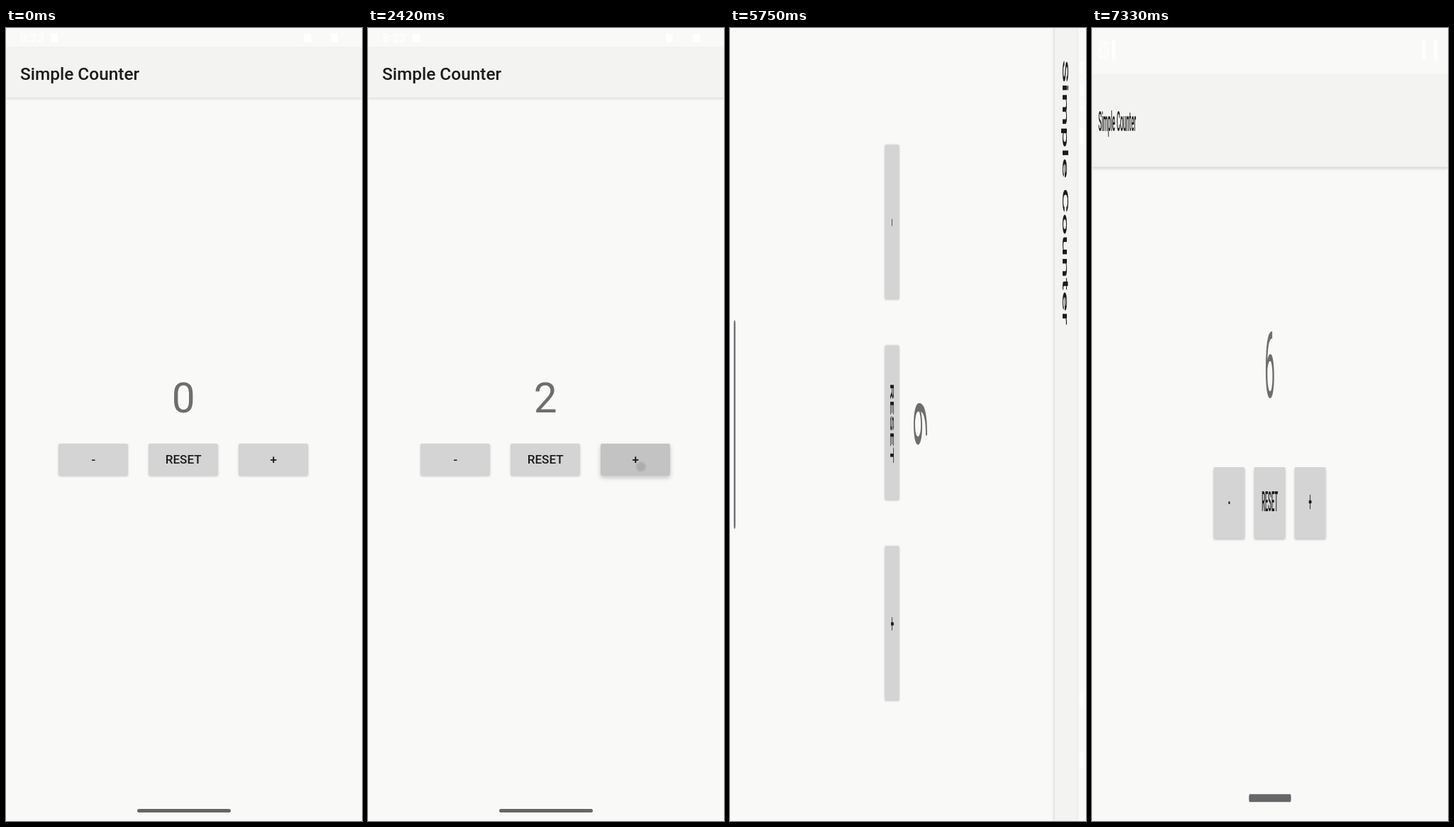
These frames come from a looping animation (502 by 1116 pixels, 8 s). An HTML page:

```html
<!DOCTYPE html>
<html lang="en">
<head>
<meta charset="utf-8">
<title>Counter</title>
<style>
  html, body { margin: 0; width: 100%; height: 100%; overflow: hidden; background: #f9f9f8; }
  #display { position: absolute; overflow: hidden; transform-origin: 0 0; background: #f9f9f8; }
  .screen {
    position: absolute; left: 50%; top: 50%; overflow: hidden;
    background: #f9f9f8; color: #1b1b1b; font-family: Roboto, sans-serif;
  }
  .portrait { width: 502px; height: 1116px; --bar: 70px; --top: 28px; --title: 65px; --title-size: 24.4px; }
  .landscape { width: 1116px; height: 502px; --bar: 59px; --top: 29px; --title: 59.4px; --title-size: 17.1px; }
  .screen * { position: absolute; box-sizing: border-box; white-space: nowrap; }
  .status { inset: 0 0 auto; height: 28px; color: #fff; font: 500 17px/28px Roboto, sans-serif; }
  .status span { left: 20px; }
  .status i { top: 8px; width: 10px; height: 12px; background: #fff; }
  .bar {
    left: 0; right: 0; top: var(--top); height: var(--bar);
    background: #f3f3f1; box-shadow: 0 1px 4px rgba(0, 0, 0, .16);
  }
  .title {
    left: 20px; top: calc(var(--title) - 20px);
    font-weight: 500; font-size: var(--title-size); line-height: 40px;
  }
  .count {
    left: -.8px; width: 100%; top: calc(50% - 77px); text-align: center;
    font-size: 58.6px; line-height: 80px; color: #6e6e6e;
  }
  .button {
    top: calc(50% + 26.6px); width: 98px; height: 45px; border-radius: 2.4px;
    background: #d4d4d4; box-shadow: 0 1px 3px rgba(0, 0, 0, .2);
    text-align: center; font-weight: 500; font-size: 17.1px; line-height: 45px;
  }
  .ripple { inset: 0; border-radius: 2.4px; }
  .pill { left: calc(50% - 66px); bottom: 12px; width: 132px; height: 5px; border-radius: 3px; background: #66666a; }
</style>
</head>
<body>
<div id="display"></div>
<script>
const LOOP = 8000, TURN = 5750, SPIN = 6920, SPIN_TIME = 400, OLD_FADE = 130;
const FIRST_TAP = 1420, TAP_GAP = 485, TAPS = 6, RELEASE = 100;
const SHORT = 502, LONG = 1116;

const display = document.getElementById('display');
const clamp = x => Math.max(0, Math.min(1, x));
const button = (label, offset) =>
  `<div class="button" style="left:calc(50% + ${offset}px)"><div class="ripple"></div>${label}</div>`;

function addScreen(kind) {
  const el = document.createElement('div');
  el.className = `screen ${kind}`;
  el.innerHTML = `
    <div class="bar"></div>
    <div class="status"><span>8:23</span><i style="left:63px"></i><i style="right:72px"></i><i style="right:34px"></i></div>
    <div class="title">Simple Counter</div>
    <div class="count">6</div>
    ${button('-', -176.8)}${button('RESET', -49.8)}${button('+', 77.2)}
    <div class="pill"></div>`;
  display.append(el);
  return el;
}

const landscape = addScreen('landscape');
const portrait = addScreen('portrait');
const count = portrait.querySelector('.count');
const plus = portrait.querySelectorAll('.button')[2];
const ripple = plus.querySelector('.ripple');

// Each tap grows a spot from the finger, holds it, then fades it out.
function drawTaps(t) {
  const spots = [];
  let value = 0, pressed = false;
  for (let i = 0; i < TAPS; i++) {
    const age = t - FIRST_TAP - i * TAP_GAP;
    if (age >= RELEASE) value++;
    if (age < 0 || age > 800) continue;
    if (age < 150) pressed = true;
    const radius = 4 + 105 * (age / 225) ** 1.6;
    const alpha = 0.11 * (1 - clamp((age - 400) / 400));
    const drift = clamp(age / 225);
    const x = 58 - 9 * drift, y = 34 - 11 * drift;
    spots.push(`radial-gradient(circle at ${x}px ${y}px, rgba(0,0,0,${alpha}) ${radius * 0.6}px, rgba(0,0,0,0) ${radius}px)`);
  }
  count.textContent = value;
  ripple.style.background = spots.join(',') || 'none';
  plus.style.boxShadow = pressed ? '0 3px 6px rgba(0,0,0,.22)' : '';
}

// Once turned, the wide display is squeezed into the tall stage.
function drawDisplay(t) {
  const turned = t >= TURN;
  const [w, h] = turned ? [LONG, SHORT] : [SHORT, LONG];
  const progress = clamp((t - SPIN) / SPIN_TIME);
  const eased = progress * progress * (3 - 2 * progress);
  const place = `translate(-50%, -50%) rotate(${turned ? 90 * (1 - eased) : 0}deg)`;
  display.style.width = `${w}px`;
  display.style.height = `${h}px`;
  display.style.transform = turned ? `scale(${SHORT / LONG}, ${LONG / SHORT})` : 'none';
  landscape.style.transform = portrait.style.transform = place;
  landscape.style.visibility = t >= SPIN ? 'visible' : 'hidden';
  portrait.style.opacity = 1 - clamp((t - SPIN) / OLD_FADE);
}

const start = performance.now();
function frame() {
  const t = (performance.now() - start) % LOOP;
  drawTaps(t);
  drawDisplay(t);
  requestAnimationFrame(frame);
}
frame();
</script>
</body>
</html>
```
